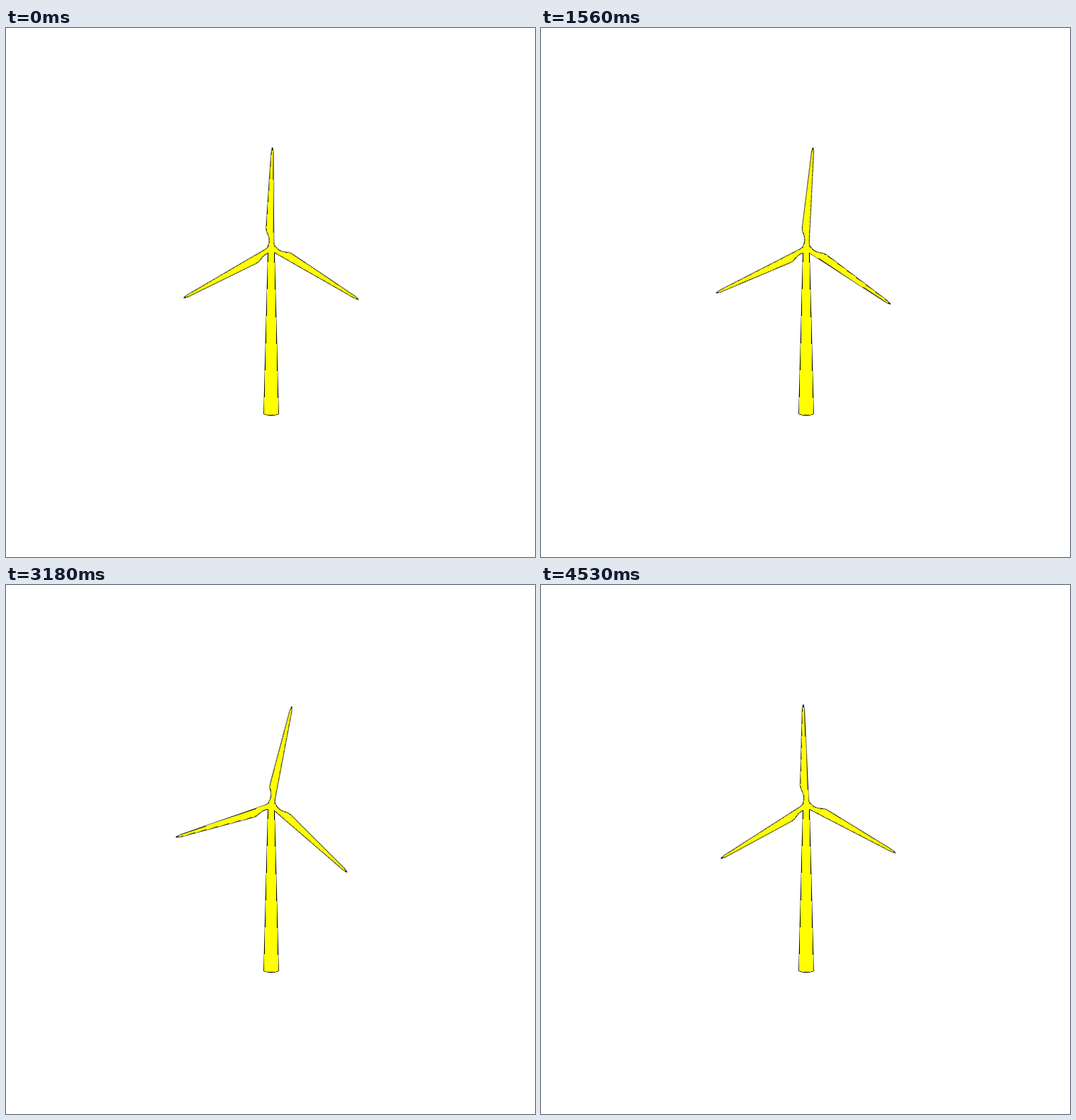
Write an HTML page without scripts that moves like this. It is 748 px wide and 748 px high and loops after 4560 ms.

```html
<!DOCTYPE html>
<html lang="en">
<head>
<meta charset="utf-8">
<title>Wind turbine</title>
<style>
  html, body { margin: 0; width: 100%; height: 100%; overflow: hidden; background: #fff; }
  svg { display: block; width: 100%; height: 100%; }
  .outline { fill: #000; stroke: #000; stroke-width: 1.6; stroke-linejoin: round; }
  .fill { fill: #ff0; shape-rendering: crispEdges; }
  .spin { animation: spin 4560ms steps(152) infinite; }
  @keyframes spin {
    from { transform: rotate(0.5deg); }
    to { transform: rotate(360.5deg); }
  }
</style>
</head>
<body>
<svg viewBox="0 0 748 748">
  <defs>
    <path id="tower" d="M370.9 316 L364.9 545.5 Q375 549.5 385.1 545.5 L379.1 316 Z"/>
    <path id="blade" d="M0 -142 L-1.3 -135 L-7.6 -29 Q-7.8 -25 -5.6 -21
      Q-3 -17 -3 -11 Q-3 -7 -4.6 -3 L0 0 L4.3 -3 Q2.7 -5 2.7 -9 L1 -135 Z"/>
    <g id="rotor">
      <circle r="4.6"/>
      <use href="#blade"/>
      <use href="#blade" transform="rotate(120)"/>
      <use href="#blade" transform="rotate(240)"/>
    </g>
  </defs>

  <!-- Outlines sit below the fills so the parts merge into one silhouette. -->
  <g class="outline">
    <use href="#tower"/>
    <g transform="translate(375.5 311.5)"><g class="spin"><use href="#rotor"/></g></g>
  </g>
  <g class="fill">
    <use href="#tower"/>
    <g transform="translate(375.5 311.5)"><g class="spin"><use href="#rotor"/></g></g>
  </g>
</svg>
</body>
</html>
```
